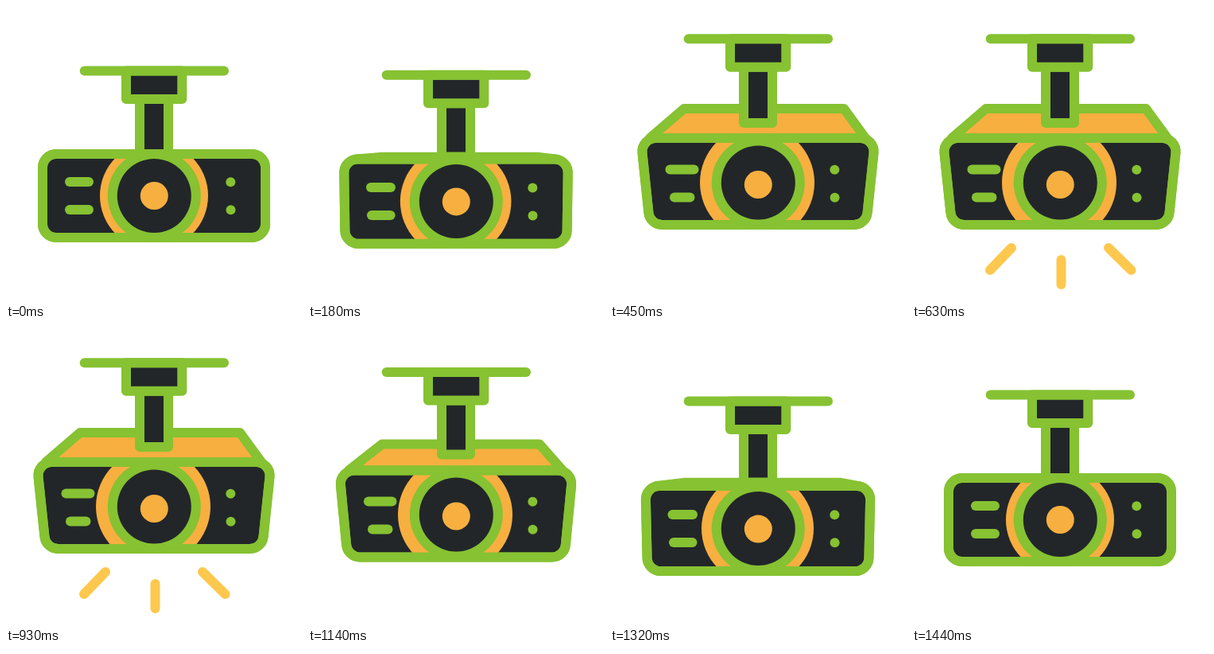
Animation, 372 px wide and 372 px high, one loop 1500 ms. Source, as an HTML page with a canvas:

```html
<!DOCTYPE html>
<html lang="en">
<head>
<meta charset="utf-8">
<title>Projector</title>
<style>
html, body { margin: 0; width: 100%; height: 100%; overflow: hidden; background: #fff; }
canvas { display: block; width: 372px; height: 372px; }
</style>
</head>
<body>
<canvas id="stage" width="372" height="372"></canvas>
<script>
const ctx = document.getElementById('stage').getContext('2d');
const GREEN = '#86c232', DARK = '#222629', ORANGE = '#f7af40', YELLOW = '#fec84e';
const LOOP = 1500, STEP = 30;

// Pose values at these steps of the lift; heights are relative to the part above.
const KEYS = [0, 4, 7, 10, 12];
const POSE = {
  front: [104.5, 106.5, 114.5, 123.5, 124.8],
  back: [104.5, 102.3, 97.5, 90.5, 87.8],
  stem: [104.5, 102, 101, 103.5, 105.8],
  height: [105, 107, 109, 109, 109],
  topOut: [0, 1.5, 5, 6.8, 7.4],
  bottomIn: [0, 1, 2.4, 3.7, 4.1],
  lidLeft: [64, 58, 54, 51, 50],
  lidRight: [308, 313, 317, 320, 321],
  backRight: [290, 290, 290, 291, 294],
  lens: [52.5, 53.5, 55, 55.5, 56],
  pupil: [0, 0.5, 1.5, 2, 2.5],
  ring: [68, 70.5, 72, 72, 72],
  ringX: [186, 185.5, 185, 185, 185],
  slat: [35, 36, 38.5, 39, 39.5],
  upperLeft: [80, 78.5, 77, 76, 75.5],
  upperRight: [104, 104, 105, 105.5, 105.5],
  lowerLeft: [80, 80, 81, 81, 81],
  lowerRight: [104, 103.5, 102, 100.5, 100.5]
};

const clamp = x => Math.min(1, Math.max(0, x));
const mix = (a, b, p) => a + (b - a) * p;

// Same curve as CSS ease-in-out, solved by bisection.
function ease(x) {
  x = clamp(x);
  let lo = 0, hi = 1;
  for (let i = 0; i < 24; i++) {
    const t = (lo + hi) / 2, u = 1 - t;
    if (3 * u * u * t * 0.42 + 3 * u * t * t * 0.58 + t * t * t < x) lo = t;
    else hi = t;
  }
  return lo * lo * (3 - 2 * lo);
}

// Monotone cubic through the keyed values, flat at both ends.
function spline(v, k) {
  const last = KEYS.length - 1;
  if (k >= KEYS[last]) return v[last];
  const slope = i => (v[i + 1] - v[i]) / (KEYS[i + 1] - KEYS[i]);
  const tangent = i => {
    if (i === 0 || i === last) return 0;
    const a = slope(i - 1), b = slope(i);
    return a * b > 0 ? 2 * a * b / (a + b) : 0;
  };
  let i = 0;
  while (k >= KEYS[i + 1]) i++;
  const h = KEYS[i + 1] - KEYS[i], t = (k - KEYS[i]) / h, s = t * t * (3 - 2 * t);
  return mix(v[i], v[i + 1], s) +
    h * t * (1 - t) * ((1 - t) * tangent(i) - t * tangent(i + 1));
}

function stepAt(t) {
  if (t < 120) return 0;
  if (t < 930) return Math.min(18, 1 + Math.floor((t - 120) / STEP));
  return Math.max(0, 17 - Math.floor((t - 930) / STEP));
}

function line(x1, y1, x2, y2, color = GREEN) {
  ctx.strokeStyle = color;
  ctx.beginPath();
  ctx.moveTo(x1, y1);
  ctx.lineTo(x2, y2);
  ctx.stroke();
}

function disc(x, y, r, fill) {
  ctx.fillStyle = fill;
  ctx.beginPath();
  ctx.arc(x, y, r, 0, 2 * Math.PI);
  ctx.fill();
}

function shape(points, fill, radius = 0) {
  const n = points.length, [ax, ay] = points[0], [bx, by] = points[n - 1];
  const path = new Path2D();
  path.moveTo((ax + bx) / 2, (ay + by) / 2);
  points.forEach(([x, y], i) => path.arcTo(x, y, ...points[(i + 1) % n], radius));
  path.closePath();
  ctx.fillStyle = fill;
  ctx.strokeStyle = GREEN;
  ctx.fill(path);
  ctx.stroke(path);
  return path;
}

const box = (l, t, r, b) => [[l, t], [r, t], [r, b], [l, b]];

function drawRays(k) {
  const grow = ease((k - 12) / 5);
  if (!grow) return;
  for (const [x1, y1, x2, y2] of [[125, 304, 98, 332], [187.5, 319, 187.5, 350], [247, 304, 275.5, 332]])
    line(x1, y1, mix(x1, x2, grow), mix(y1, y2, grow), YELLOW);
}

function draw(k) {
  const p = {};
  for (const name in POSE) p[name] = spline(POSE[name], k);
  const mount = k < 6 ? mix(81.5, 92, ease(k / 6)) : mix(92, 41.2, ease((k - 6) / 6));
  const front = mount + p.front, back = mount + p.back, bottom = front + p.height;
  const lens = front + p.lens, slat = front + p.slat;

  ctx.fillStyle = '#fff';
  ctx.fillRect(0, 0, 372, 372);
  ctx.lineWidth = 12;
  ctx.lineCap = ctx.lineJoin = 'round';

  drawRays(k);

  // Lid, stem and ceiling mount
  shape([[93, back], [p.backRight, back], [p.lidRight, front], [p.lidLeft, front]], ORANGE);
  shape(box(168, mount + 35.5, 204, mount + p.stem), DARK);
  shape(box(151, mount, 221.3, mount + 35.5), DARK);
  line(98.7, mount, 274, mount);

  // Front panel
  const face = shape([
    [46 - p.topOut, front], [326 + p.topOut, front],
    [326 - p.bottomIn, bottom], [46 + p.bottomIn, bottom]
  ], DARK, 17);
  ctx.save();
  ctx.clip(face);
  disc(p.ringX, lens, p.ring, ORANGE);
  ctx.restore();
  ctx.strokeStyle = GREEN;
  ctx.stroke(face);

  // Lens
  disc(186.3, lens, 58.5, GREEN);
  disc(186.3, lens, 46.5, DARK);
  disc(186.3, lens + p.pupil, 17.5, ORANGE);

  // Vents and lights
  line(p.upperLeft, slat, p.upperRight, slat);
  line(p.lowerLeft, slat + 35, p.lowerRight, slat + 35);
  disc(282.3, slat + 0.3, 6, GREEN);
  disc(282.5, slat + 35.3, 6, GREEN);
}

const start = performance.now();
function tick() {
  draw(stepAt((performance.now() - start) % LOOP));
  requestAnimationFrame(tick);
}
tick();
</script>
</body>
</html>
```
